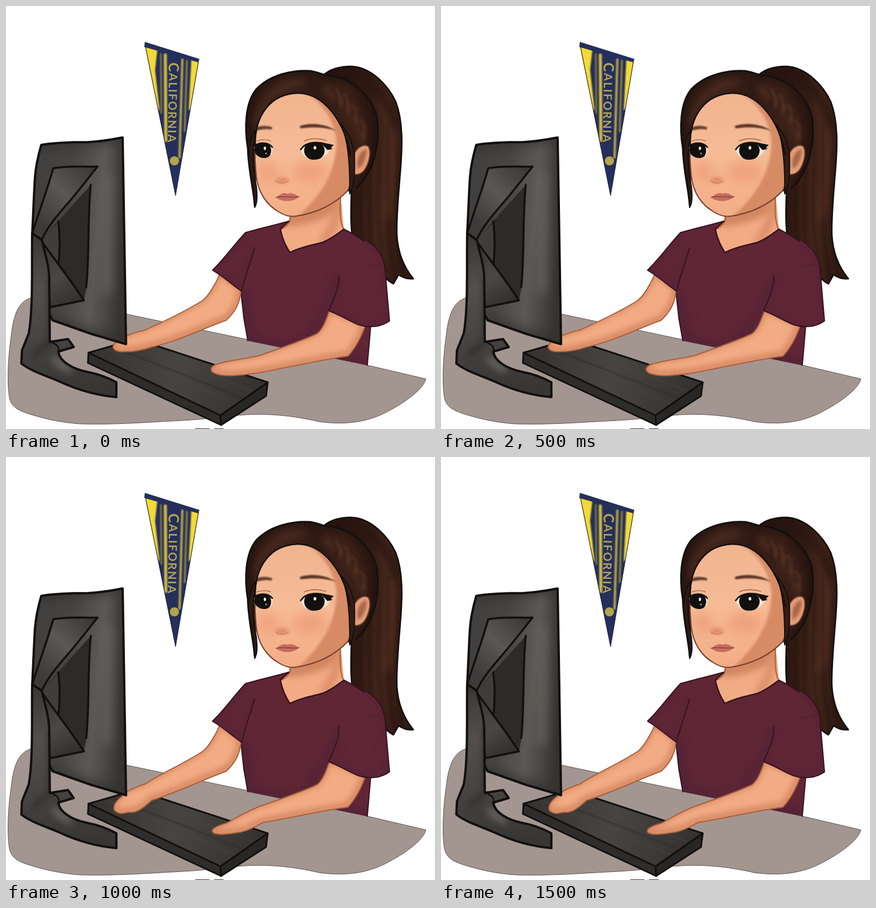
These frames come from a looping animation (754 by 743 pixels, 1750 ms). An HTML page with a canvas:

```html
<!DOCTYPE html>
<html lang="en">
<head>
<meta charset="utf-8">
<title>At the desk</title>
<style>
html, body { margin: 0; width: 100%; height: 100%; overflow: hidden; background: #fff; }
canvas { display: block; width: 754px; height: 743px; }
</style>
</head>
<body>
<canvas id="stage" width="754" height="743"></canvas>
<script>
const ctx = document.getElementById('stage').getContext('2d');
ctx.lineJoin = ctx.lineCap = 'round';

const STEP = 250;
const BLACK = '#12100f';
const SKIN = '#f2ac83', SKIN_DARK = '#d28660', SKIN_LINE = '#a9613f';
const SHIRT = '#602635', SHIRT_LINE = '#35121d';
const NAVY = '#252f5b', GOLD = '#f3da36', DULL = '#b5a54c';

function fill(d, color) {
  ctx.fillStyle = color;
  ctx.fill(new Path2D(d));
}

function line(d, color, width) {
  ctx.strokeStyle = color;
  ctx.lineWidth = width;
  ctx.stroke(new Path2D(d));
}

function shape(d, color, edge, width) {
  fill(d, color);
  line(d, edge, width);
}

function within(d, draw) {
  ctx.save();
  ctx.clip(new Path2D(d));
  draw();
  ctx.restore();
}

function blurred(radius, draw) {
  ctx.save();
  ctx.filter = `blur(${radius}px)`;
  draw();
  ctx.restore();
}

function oval(x, y, rx, ry, color, turn = 0) {
  ctx.fillStyle = color;
  ctx.beginPath();
  ctx.ellipse(x, y, rx, ry, turn, 0, 7);
  ctx.fill();
}

function blend(x0, y0, x1, y1, ...colors) {
  const g = ctx.createLinearGradient(x0, y0, x1, y1);
  colors.forEach((c, i) => g.addColorStop(i / (colors.length - 1), c));
  return g;
}

// ---- desk, pennant, keyboard, monitor ----

function desk() {
  const d = 'M42 513C21 521 13 543 9 580C3 620 2 665 6 688C9 704 22 711 42 717C70 726 100 732 130 734' +
    'C190 736 250 731 310 728C350 726 380 721 420 718C470 715 515 722 550 730' +
    'C600 737 640 730 675 710C705 694 734 672 738 655L640 632L425 586L211 541L60 511Z';
  shape(d, '#a39690', '#5d5551', 1);
  line('M333 742.5H357M366 742.5H382', '#333', 1);
}

function pennant() {
  const flag = 'M244 70L339 97L298 333Z';
  fill(flag, NAVY);
  within(flag, () => {
    blurred(0.8, () => {
      fill('M240 66L266 77L262 112L270 184L240 150Z', GOLD);
      fill('M326 90L345 96L335 168L321 184Z', GOLD);
      line('M272 84L273 188', '#8d843f', 2.5);
      line('M280 86L281 236', '#cdb843', 5.5);
      line('M310 94L305 266', '#b8a644', 4);
      line('M318 96L314 220', '#958a42', 3);
    });
  });
  line('M245 70L298 333L338 98', '#1d2340', 1);
  fill('M244 63L340 93L338 99L243 72Z', NAVY);
  ctx.save();
  ctx.translate(287, 99);
  ctx.rotate(Math.PI / 2 + 0.02);
  ctx.filter = 'blur(0.6px)';
  ctx.fillStyle = '#b3a556';
  ctx.letterSpacing = '2px';
  ctx.font = 'bold 25px Lato, sans-serif';
  ctx.fillText('C', 0, 1);
  const x = ctx.measureText('C').width;
  ctx.font = 'bold 20px Lato, sans-serif';
  ctx.fillText('ALIFORNIA', x, 0);
  ctx.restore();
  oval(296, 272, 8, 8, DULL);
}

function keyboard() {
  const top = 'M145 609L228 585L460 661L377 719Z';
  shape('M145 609L377 719L378 736L144 627Z', '#2f2d2c', BLACK, 3);
  shape('M377 719L460 661L457 685L378 736Z', '#292726', BLACK, 3);
  fill(top, blend(160, 600, 440, 680, '#353331', '#474542', '#353331'));
  within(top, () => blurred(1, () => {
    line('M176 603L402 698M205 592L434 676', '#4d4946', 1);
    line('M190 600L415 688', '#2f2d2c', 1.5);
  }));
  line(top, BLACK, 3);
}

function monitor() {
  const back = 'M62 244C85 240 115 239 145 239C170 238 187 234 205 231' +
    'L207 350L211 594L150 576L82 552L55 500L46 400C48 365 49 330 51 300C53 275 58 258 62 244Z';
  fill(back, blend(55, 400, 212, 415, '#42403e', '#474543', '#5c5955', '#383635'));
  within(back, () => blurred(9, () => {
    line('M62 244L205 233L211 594L80 552', '#32302f', 12);
    line('M178 300L176 500', '#67645f', 13);
  }));
  line(back, BLACK, 4);

  fill('M149 314C143 370 147 440 141 497L137 517L63 410Z', '#2d2b2a');
  fill('M92 380C96 405 95 430 92 458L63 410Z', '#403e3c');
  line('M149 314C143 370 147 440 141 494M92 378C95 405 95 430 92 455', BLACK, 3.5);
  shape('M62 412C90 452 115 483 137 517L78 529L70 480Z',
    blend(65, 430, 120, 520, '#3a3836', '#4a4745', '#32302f'), BLACK, 3.5);

  const arm = 'M83 285C110 280 135 283 161 282L125 327C105 352 78 378 63 410L46 400C58 360 72 325 83 285Z';
  shape(arm, blend(60, 380, 150, 285, '#3d3b39', '#5a5754', '#3b3937'), BLACK, 3.5);

  const stand = 'M46 399L63 411C68 435 76 455 76 480L77 590L109 585L119 599L92 607' +
    'C94 625 118 637 140 642C160 646 180 653 194 661L194 687' +
    'C160 684 125 674 95 660C70 649 45 642 27 628L28 605L40 575C48 530 45 455 46 399Z';
  fill(stand, blend(60, 400, 95, 680, '#393735', '#524f4c', '#464341', '#383634'));
  within(stand, () => blurred(6, () => {
    line('M78 480V590L50 612', '#312f2d', 9);
    oval(98, 630, 22, 8, '#625f5a', 0.6);
  }));
  line(stand, BLACK, 4);
  line('M77 589C88 594 95 598 92 607', BLACK, 2.5);
}

// ---- ponytail ----

const TAILS = {
  rest: {
    d: 'M558 121C570 111 588 106 606 106C642 107 672 140 685 168C698 202 697 245 693 292' +
      'C690 330 686 370 687 402C689 437 702 462 716 479C704 480 697 477 690 472L681 488' +
      'C664 480 630 440 608 400C604 370 608 335 607 300Z',
    shift: 0
  },
  back: {
    d: 'M558 121C570 111 586 105 602 105C638 108 668 142 683 172C696 206 692 250 689 292' +
      'C686 330 683 372 685 404C688 440 700 465 715 485C704 485 697 481 690 476L680 488' +
      'C660 480 620 440 600 400C594 370 599 335 600 300Z',
    shift: -5
  },
  near: {
    d: 'M558 121C570 111 588 106 606 106C642 107 672 140 685 168C698 202 697 245 693 292' +
      'C690 330 686 370 687 402C689 437 702 462 716 479C704 480 697 477 690 472L681 488' +
      'C664 480 626 440 604 400C600 370 604 335 604 300Z',
    shift: 0
  },
  swing: {
    d: 'M558 121C570 111 588 106 604 106C642 107 672 140 686 168C699 204 698 245 694 292' +
      'C691 330 688 368 690 398C694 435 709 462 726 484C711 483 702 478 694 473L681 487' +
      'C664 480 630 440 608 400C604 370 608 335 607 300Z',
    shift: 3
  }
};

function ponytail({ d, shift }) {
  fill(d, blend(600, 200, 700, 205, '#27140f', '#301a13', '#40241a', '#2f1913'));
  within(d, () => {
    blurred(7, () => {
      line(`M662 165C688 210 ${678 + shift} 300 ${668 + shift} 370`, '#4f2d21', 13);
      line('M600 112C640 125 670 160 685 210', '#2a1610', 12);
    });
    blurred(1, () => {
      for (let i = 0; i < 9; i++) {
        const x = 621 + i * 8 + shift;
        line(`M${x + 2} ${210 + i % 3 * 20}C${x + 8} 300 ${x - 8} 375 ${x + 15} 480`,
          i % 2 ? 'rgba(115,70,48,.14)' : 'rgba(25,10,8,.18)', 2);
      }
    });
  });
  line(d, '#120b0a', 2.5);
}

// ---- head ----

const HAIRLINE = 'M438 245C437 192 465 154 513 153C559 153 595 203 605 262';
const FACE = HAIRLINE + 'C609 292 608 312 600 325' +
  'C578 348 546 364 510 369C500 371 490 368 480 362C459 350 444 329 440 300C438 280 437 263 438 245Z';
const CAP_EDGE = 'M437 350C435 320 426 290 425 250C419 215 420 170 440 146C465 120 505 112 535 114' +
  'C548 116 555 120 560 121C601 123 640 150 652 195C658 240 648 290 616 320';
const CAP = CAP_EDGE + 'L604 326L440 300Z';
const COLLAR = 'M497 378L482 392C486 410 491 420 499 433C520 422 540 420 557 415C574 408 584 399 594 392';

function neck() {
  const d = COLLAR + 'L588 335L500 360Z';
  fill(d, SKIN);
  within(d, () => blurred(6, () => {
    line('M500 375C545 370 580 352 598 330', SKIN_DARK, 24);
    line('M590 340C578 370 578 390 560 410', '#dd9069', 16);
  }));
  line('M500 370C501 379 494 388 482 393M588 338C586 360 588 380 593 392', SKIN_LINE, 2);
}

function hair() {
  fill(CAP, blend(430, 180, 655, 190, '#2e1913', '#3c221a', '#301a14', '#3a2018', '#291510'));
  within(CAP, () => {
    blurred(6, () => {
      line('M440 205C446 170 475 138 520 134', '#4a2b20', 10);
      line('M565 148C600 165 622 200 628 235', '#482a1e', 18);
      line(CAP_EDGE, '#22120e', 9);
    });
    blurred(2, () => {
      for (let i = 0; i < 9; i++) {
        const x = 573 + i * 7, y = 146 + i * i * 1.1;
        line(`M${x} ${y}C${x + 8} ${y + 8} ${x + 10} ${y + 18} ${x + 7} ${y + 30}`,
          i % 2 ? 'rgba(120,76,55,.34)' : 'rgba(28,13,10,.3)', 4);
      }
    });
  });
  line(CAP_EDGE, BLACK, 3);
}

function face() {
  const ear = 'M613 258C618 248 630 241 637 247C643 258 637 278 630 288C624 296 616 297 611 295Z';
  shape(ear, '#e59d76', '#70402d', 2);
  blurred(2, () => fill('M634 251C622 254 614 270 619 286C627 281 634 268 634 251Z', '#a9674a'));

  fill(FACE, blend(500, 155, 500, 370, '#f0b48f', '#f6bc97', '#f3ad85'));
  within(FACE, () => {
    blurred(2, () => fill('M520 150C556 166 578 203 581 238C579 280 568 320 510 373L615 373L615 150Z', '#d78b65'));
    blurred(10, () => {
      oval(460, 290, 18, 18, 'rgba(232,132,94,.42)');
      oval(534, 291, 32, 18, 'rgba(232,132,94,.42)');
    });
    blurred(3, () => oval(485, 306, 12, 5, '#df8868'));
  });
  line(FACE, '#75402d', 2);
  blurred(0.7, () => line('M475 308C480 312 490 312 496 308', '#cd7659', 1.5));

  blurred(0.8, () => {
    fill('M439 214C448 209 460 210 468 213L467 217C457 215 448 217 439 219Z', '#66402f');
    fill('M516 211C535 204 563 207 580 219C562 213 540 212 518 215Z', '#5a3527');
  });
  fill('M475 336C483 329 490 327 495 330C501 327 508 330 515 335C505 345 484 345 475 336Z', '#c76c61');
  line('M475 336C485 333 505 337 515 335', '#8d403d', 1.6);
}

function eyes(open) {
  const left = 'M434 249C443 239 460 239 468 248C470 258 466 265 456 267C444 268 436 260 434 249Z';
  const right = 'M518 252C526 239 550 235 571 249C566 263 553 270 541 270C529 270 520 262 518 252Z';
  for (const d of [left, right]) fill(d, '#f3e3d5');
  within(left, () => oval(451, 254, 15, 16, BLACK));
  within(right, () => oval(542, 254, 18, 17, BLACK));
  if (open) {
    oval(455, 250, 2, 3, '#fff');
    oval(457, 259, 1.3, 1.6, '#bbb');
    oval(543, 249, 2.4, 3, '#fff');
    line('M434 248C443 239 460 238 468 248M518 252C526 239 550 235 570 247', BLACK, 2.6);
    fill('M552 239L576 244L571 249L574 251L565 253Z', BLACK);
    line('M441 237C449 234 459 234 465 237M524 237C535 232 550 232 562 236', '#8b5240', 1.2);
  } else {
    fill('M433 251C441 230 460 229 470 258C458 256 445 255 433 251Z', '#d59570');
    fill('M515 262C523 230 558 224 572 249C560 260 536 263 515 262Z', '#d59570');
    line('M434 250C445 257 458 257 469 258', BLACK, 4);
    line('M518 263C536 264 556 261 569 252', BLACK, 4);
    fill('M558 256L576 249L566 262Z', BLACK);
    blurred(1, () => line('M436 242C446 230 461 238 467 251M519 252C530 231 554 230 567 243', '#bd7959', 1.5));
  }
}

function strands() {
  shape('M438 218C431 230 426 248 426 265C430 300 437 320 437 354C443 344 441 328 440 316C434 292 432 258 438 232Z',
    '#2f1a14', BLACK, 2);
  shape('M588 207C599 228 605 270 604 330C612 320 614 290 612 258C609 238 602 222 588 207Z',
    '#341d16', BLACK, 2);
  line(HAIRLINE, BLACK, 2.4);
}

// ---- shirt and arms ----

const LEFT_UPPER = 'M376 470C368 490 355 510 346 517C310 540 270 557 ';
const LEFT_LOWER = 'C300 590 350 565 387 552C402 538 412 522 413 498Z';
const RIGHT_UPPER = 'M568 536C562 555 555 570 546 576C515 590 480 602 445 614';
const RIGHT_LOWER = 'C495 635 550 622 601 615C615 600 625 580 632 560Z';
const SLEEVES = {
  left: 'M421 398C400 420 385 443 363 464C380 474 398 490 414 501C420 475 430 450 437 425',
  right: 'M632 411C651 422 663 438 666 460L674 553C660 564 638 566 620 560C602 553 588 543 567 535C576 514 586 495 585 474'
};

const ARMS = {
  high: {
    left: LEFT_UPPER + '245 569C225 573 200 582 192 592C183 601 192 606 200 607C225 609 244 603 256 599' + LEFT_LOWER,
    right: RIGHT_UPPER + 'C420 620 385 623 368 630C359 634 358 641 366 645C385 653 412 648 440 645' + RIGHT_LOWER,
    sleeves: SLEEVES
  },
  low: {
    left: LEFT_UPPER + '245 574C225 581 208 588 203 597C190 606 186 618 193 623C202 629 208 625 216 624' +
      'C232 626 246 612 256 603' + LEFT_LOWER,
    right: RIGHT_UPPER + 'C420 624 400 636 388 643C370 648 358 654 364 660C375 666 395 661 412 659' +
      'C430 655 440 648 452 642' + RIGHT_LOWER,
    sleeves: SLEEVES
  },
  drawn: {
    left: 'M385 468C380 490 370 510 362 518C335 540 300 562 282 573C262 576 240 586 233 597' +
      'C224 605 223 616 230 620C240 625 250 620 258 617C278 613 288 608 296 603' +
      'C330 582 365 565 403 550C412 537 416 515 414 490Z',
    right: 'M576 536C571 556 564 572 556 577C525 590 495 604 465 615C445 626 425 636 410 644' +
      'C393 649 383 654 389 660C402 667 420 661 440 658C456 653 464 646 476 642' +
      'C520 634 565 622 609 613C620 600 628 582 632 562Z',
    sleeves: {
      left: 'M421 398C405 420 392 442 375 459C389 469 400 483 414 492C422 470 431 448 437 425',
      right: 'M632 411C651 422 663 438 667 460C672 495 678 525 686 549C674 563 652 567 632 562C612 556 594 545 573 535C579 514 586 495 585 474'
    }
  }
};

function torso() {
  const d = 'M497 378C472 385 445 391 421 398L417 470L413 503L418 548L425 588L635 631L641 555' +
    'L662 450C650 427 630 410 594 392C584 399 574 408 557 415C540 420 520 422 499 433C490 418 485 402 482 393Z';
  fill(d, SHIRT);
  within(d, () => blurred(9, () => {
    line('M415 500L428 588L635 631', '#4f2138', 16);
    line('M585 475C576 510 560 545 520 590', '#522138', 12);
  }));
  line('M497 378C472 385 445 391 421 398M413 503L418 548L425 588M635 631L641 562' +
    'M594 392C630 410 650 427 662 450', SHIRT_LINE, 2);
  line(COLLAR, SHIRT_LINE, 2.5);
}

function arm(d, sleeve) {
  fill(d, SKIN);
  within(d, () => blurred(5, () => {
    ctx.save();
    ctx.translate(-1, -3);
    line(d, '#d98b64', 13);
    ctx.restore();
  }));
  line(d, SKIN_LINE, 2);
  fill(sleeve, SHIRT);
  within(sleeve, () => blurred(8, () => line(sleeve, '#552139', 9)));
  line(sleeve, SHIRT_LINE, 2);
}

// ---- poses ----

const pose = (arms, tail = 'rest', open = true) => ({ arms, tail, open });
const POSES = [
  pose('high'),
  pose('low', 'back', false),
  pose('high'),
  pose('drawn', 'near'),
  pose('low'),
  pose('high', 'swing'),
  pose('low')
];

function draw({ arms, tail, open }) {
  const { left, right, sleeves } = ARMS[arms];
  ctx.fillStyle = '#fff';
  ctx.fillRect(0, 0, 754, 743);
  desk();
  pennant();
  ponytail(TAILS[tail]);
  neck();
  hair();
  face();
  eyes(open);
  strands();
  torso();
  keyboard();
  arm(left, sleeves.left);
  arm(right, sleeves.right);
  line('M630 460C640 457 650 455 660 452', '#482034', 1.2);
  monitor();
}

let shown = -1;
function tick(now) {
  const i = Math.floor(now / STEP) % POSES.length;
  if (i !== shown) draw(POSES[shown = i]);
  requestAnimationFrame(tick);
}
tick(performance.now());
</script>
</body>
</html>
```
